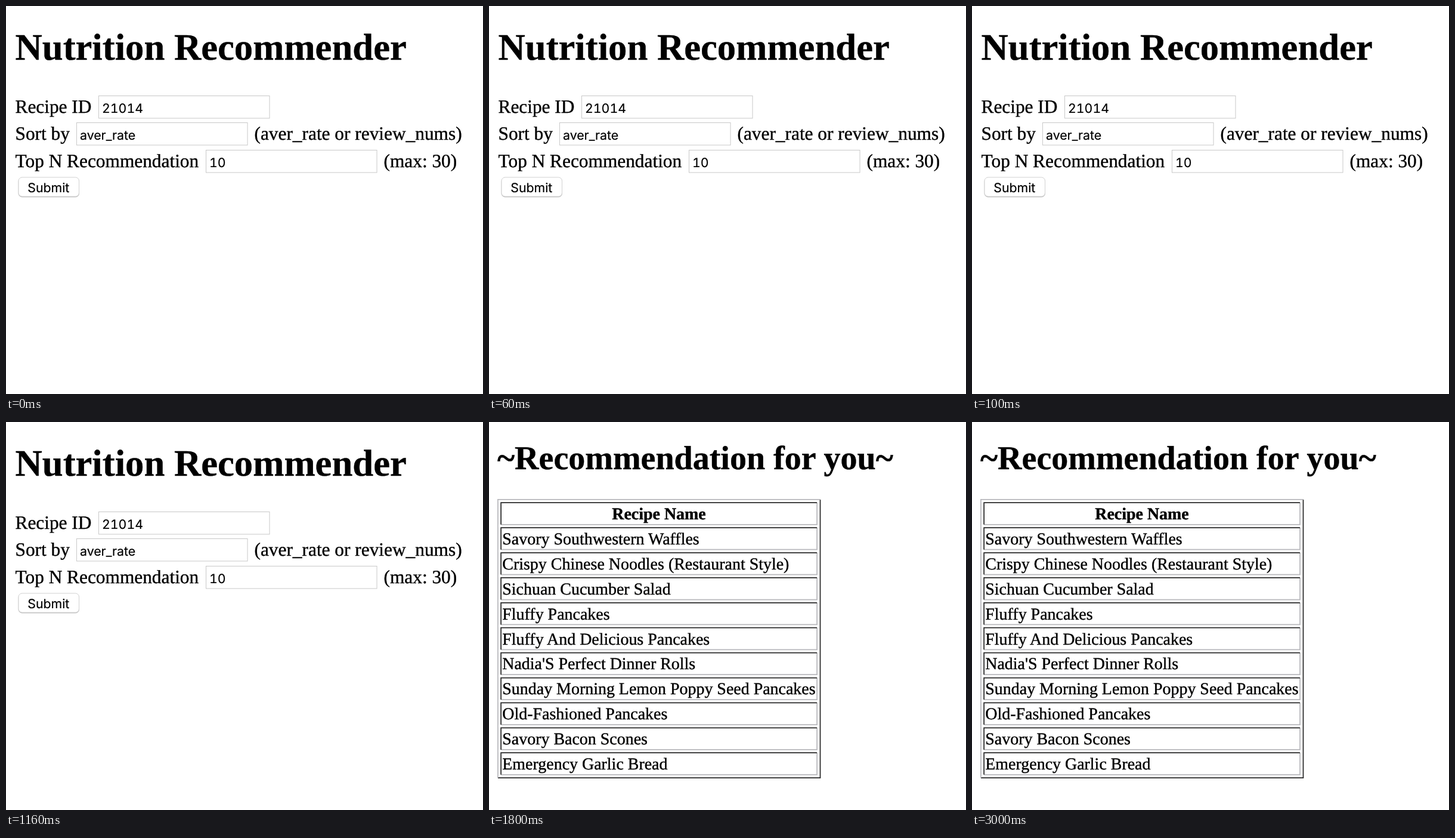
Animation of 800 by 650 pixels, one loop 3800 ms. Source, as an HTML page:

```html
<!DOCTYPE html>
<html lang="en">
<head>
<meta charset="utf-8">
<title>Nutrition Recommender</title>
<style>
  html, body { margin: 0; width: 100%; height: 100%; overflow: hidden; background: #fff; }
  svg { display: block; }
  text {
    font-family: "Liberation Serif", Times, serif;
    text-rendering: geometricPrecision;
    fill: #000;
    stroke: #000;
    stroke-width: 0.4;
  }
  #form { font-size: 31.35px; }
  #list { font-size: 27.95px; }
  .bold { font-weight: bold; }
  #form .ui {
    font-family: Inter, sans-serif;
    font-size: 21.3px;
    font-variant-numeric: tabular-nums;
    stroke-width: 0.2;
  }
  .field { fill: #fff; stroke: #c8c8c8; }
  path { fill: none; stroke-width: 1.75; }
  .light { stroke: #b9b9bd; }
  .dark { stroke: #2a2a2a; }
</style>
</head>
<body>
<svg width="800" height="650" viewBox="0 0 800 650">
  <g id="form">
    <text class="bold" x="15.5" y="89.8" font-size="62.7">Nutrition Recommender</text>
  </g>
  <g id="list" visibility="hidden">
    <text class="bold" x="14" y="79.3" font-size="56">~Recommendation for you~</text>
  </g>
</svg>
<script>
const form = document.getElementById("form");
const list = document.getElementById("list");

function add(parent, tag, attrs, content = "") {
  const el = document.createElementNS("http://www.w3.org/2000/svg", tag);
  for (const key in attrs) el.setAttribute(key, attrs[key]);
  el.textContent = content;
  parent.append(el);
}

// Frame with one colour on its top and left edges and another on the rest
function bevel(x, y, w, h, topLeft, bottomRight) {
  add(list, "path", { class: bottomRight, d: `M${x + w} ${y}v${h}h${-w}` });
  add(list, "path", { class: topLeft, d: `M${x} ${y + h}v${-h}h${w}` });
}

const fields = [
  ["Recipe ID", 155.5, "21014", ""],
  ["Sort by", 118.5, "aver_rate", "(aver_rate or review_nums)"],
  ["Top N Recommendation", 335.5, "10", "(max: 30)"]
];
fields.forEach(([label, x, value, hint], i) => {
  const y = 179 + i * 45.3;
  add(form, "text", { x: 15.5, y }, label);
  add(form, "rect", { class: "field", x, y: Math.round(y - 29) + 0.5, width: 286.5, height: 37.5 });
  add(form, "text", { class: "ui", x: x + 5.5, y }, value);
  add(form, "text", { x: x + 298, y }, hint);
});

const button = { x: 21, width: 101.5, height: 32, rx: 6 };
add(form, "rect", { ...button, y: 288, fill: "#bdbdbd", stroke: "#c4c4c4" });
add(form, "rect", { ...button, y: 287, fill: "#fff", stroke: "#d2d2d2" });
add(form, "text", { class: "ui", x: 71.3, y: 312, "text-anchor": "middle" }, "Submit");

const recipes = [
  "Savory Southwestern Waffles",
  "Crispy Chinese Noodles (Restaurant Style)",
  "Sichuan Cucumber Salad",
  "Fluffy Pancakes",
  "Fluffy And Delicious Pancakes",
  "Nadia'S Perfect Dinner Rolls",
  "Sunday Morning Lemon Poppy Seed Pancakes",
  "Old-Fashioned Pancakes",
  "Savory Bacon Scones",
  "Emergency Garlic Bread"
];
const pitch = 41.9;
bevel(14.9, 129.9, 540.6, 466.2, "light", "dark");
["Recipe Name", ...recipes].forEach((name, i) => {
  const y = 163 + i * pitch;
  bevel(20.1, y - 27.8, 530, 36.6, "dark", "light");
  if (i) add(list, "text", { x: 22.3, y }, name);
  else add(list, "text", { class: "bold", x: 285, y, "text-anchor": "middle" }, name);
});

const start = performance.now();
function draw() {
  const t = (performance.now() - start) % 3800;
  const submitted = t >= 1800;
  form.setAttribute("visibility", submitted ? "hidden" : "visible");
  list.setAttribute("visibility", submitted ? "visible" : "hidden");
  requestAnimationFrame(draw);
}
draw();
</script>
</body>
</html>
```
